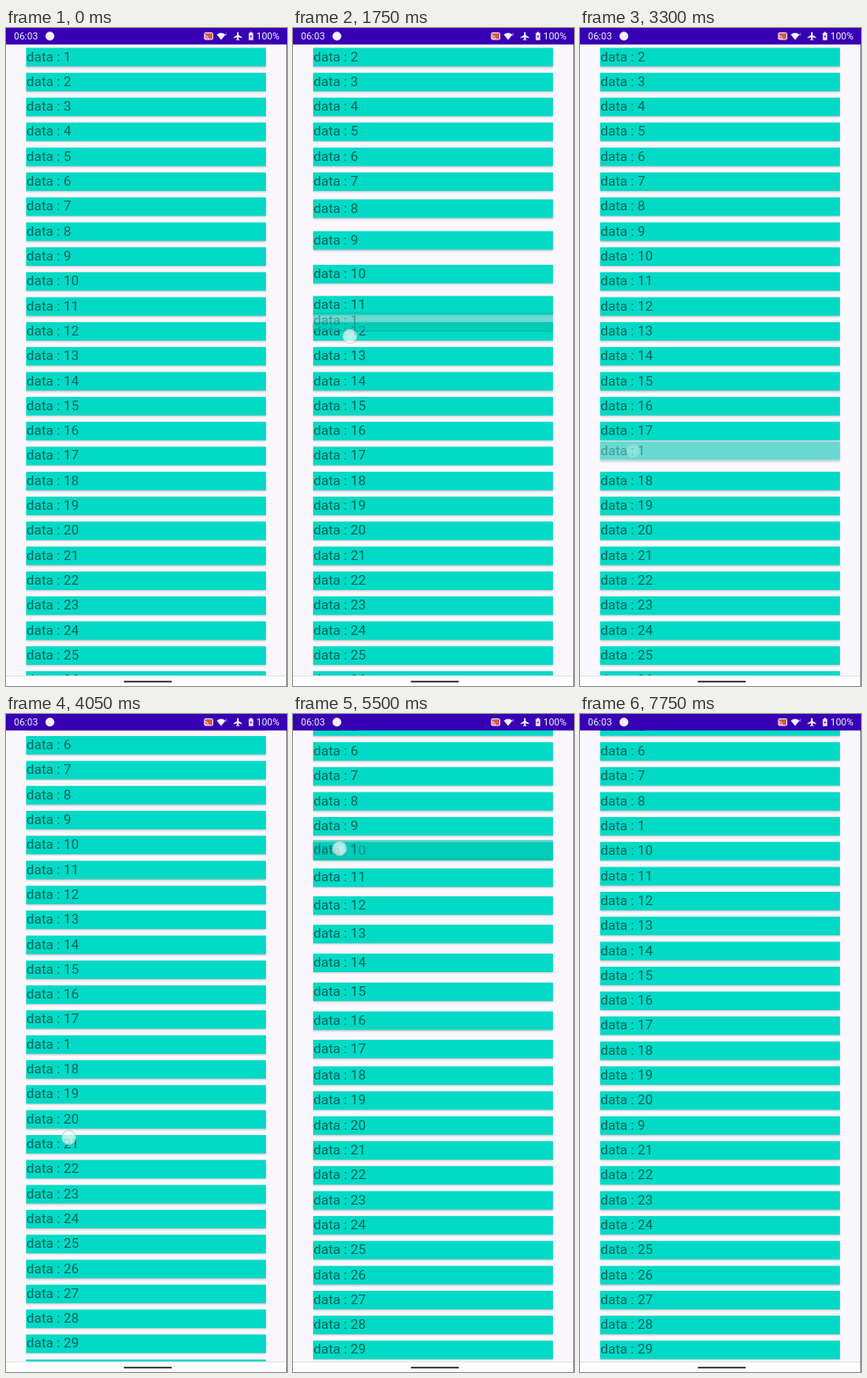
An HTML page that plays this animation: 320 by 747 pixels, repeating every 8 s.

```html
<!DOCTYPE html>
<html lang="en">
<head>
<meta charset="utf-8">
<title>Drag to reorder</title>
<style>
  html, body { margin: 0; width: 100%; height: 100%; overflow: hidden; }
  body { position: relative; background: #faf8fd; font-family: Roboto, sans-serif; }
  #list { position: absolute; inset: 0; overflow: hidden; isolation: isolate; }
  .row {
    position: absolute; left: 23.2px; top: 0; width: 273.3px; height: 20.5px;
    font-size: 15.56px; line-height: 21.6px; white-space: pre;
    color: rgba(0, 0, 0, .54); background: #03dac5;
    box-shadow: 0 1px 2px rgba(0, 0, 0, .22);
  }
  .row.held { z-index: 1; color: rgba(0, 0, 0, .3); background: rgba(3, 218, 197, .55); }
  .row.held::before {
    content: ""; position: absolute; inset: 0; z-index: -1; background: rgba(0, 0, 0, .06);
  }
  #edge { position: absolute; left: 319px; top: 18px; width: 1px; bottom: 0; background: #8f8e92; }
  #bar { position: absolute; left: 0; top: 0; }
  #bar text { font: 11px Roboto, sans-serif; fill: #f3effb; }
  #nav {
    position: absolute; left: 0; top: 735px; width: 319px; height: 12px;
    box-sizing: border-box; background: #fdfcfe; border-top: 1px solid #e3e1e6;
  }
  #nav i {
    position: absolute; left: 134px; top: 5.2px; width: 55px; height: 1.8px;
    border-radius: 1px; background: #444;
  }
  #touch {
    position: absolute; left: -8.5px; top: -8.5px; width: 17px; height: 17px;
    box-sizing: border-box; border-radius: 50%;
    border: 1px solid rgba(120, 165, 162, .45);
    background: radial-gradient(rgba(255, 255, 255, .75), rgba(240, 250, 249, .62));
  }
</style>
</head>
<body>
<div id="list"></div>
<div id="edge"></div>
<svg id="bar" width="320" height="19" viewBox="0 0 320 19">
  <rect width="320" height="18.67" fill="#3700b3"/>
  <text x="9" y="13">06:03</text>
  <circle cx="50" cy="9.3" r="5" fill="#f3effb"/>
  <rect x="226" y="5.5" width="9.5" height="7.5" rx="1" fill="#d85a4a" stroke="#f3effb"/>
  <path d="M226 8.5a4.5 4.5 0 0 1 4.5 4.5M226 10.7a2.3 2.3 0 0 1 2.3 2.3" fill="none" stroke="#f3effb"/>
  <path d="M245 13.6L240 7.4Q245 3.6 250 7.4Z" fill="#f3effb"/>
  <path d="M250.8 5.5v3.5" stroke="#9a80d8"/>
  <path d="M264 4.6q.9 0 .9 1v2.5l3.9 2.4v1l-3.9-1.1v2.2l1.1.8v.7l-2-.5-2 .5v-.7l1.1-.8v-2.2l-3.9 1.1v-1l3.9-2.4V5.6q0-1 .9-1Z" fill="#f3effb"/>
  <path d="M278 4.5h2v1h1.5v8.3h-5V5.5h1.5Z" fill="#f3effb"/>
  <path d="M279.4 7l-1.6 3h1l-.3 2.3 1.7-3h-1Z" fill="#3700b3"/>
  <text x="285" y="13">100%</text>
</svg>
<div id="nav"><i></i></div>
<div id="touch"></div>
<script>
const LOOP = 8000, TICK = 50, MOVE = 250, FADE = 150, LONG_PRESS = 440;
const LEAD = 30; // the row trails the finger by this many ms
const TOP = 22.5, PITCH = 28.31, HALF = 10.5, COUNT = 40;

const clamp = v => Math.min(1, Math.max(0, v));
const ease = v => (1 - Math.cos(Math.PI * clamp(v))) / 2;
const mix = (a, b, v) => a + (b - a) * v;

// Eased travel through [time, value] points.
const glide = (points, t) => points.slice(1).reduce(
  (v, [end, to], i) => mix(v, to, ease((t - points[i][0]) / (end - points[i][0]))), points[0][1]);

const scroll = t => glide([[3800, 0], [4050, 110.7], [4450, 103.7]], t);
const slotY = (pos, t) => TOP + pos * PITCH - scroll(t);

// from and to are list positions, path holds the row's centre, grip is the finger's offset from it
const drags = [
  { id: 1, from: 0, to: 16, down: 450, up: 3200, x: [68, 60], grip: 2.5,
    path: [[887, 33], [2327, 492], [3200, 477]] },
  { id: 1, from: 16, to: 8, down: 4600, up: 5600, x: [58, 52], grip: 12,
    path: [[5215, 382], [5559, 136]] },
  { id: 9, from: 7, to: 19, down: 6150, up: 7500, x: [46, 50], grip: 2.6,
    path: [[6700, 127.4], [7450, 473]] }
];

// Work out when the held row passes each neighbour.
const order = Array.from({ length: COUNT }, (_, i) => i + 1);
for (const d of drags) {
  d.dir = Math.sign(d.to - d.from);
  d.lift = d.down + LONG_PRESS;
  d.end = d.up + MOVE;
  d.fingerY = t => glide(d.path, t + LEAD) + d.grip;
  d.swaps = new Map();
  let t = d.lift;
  for (let p = d.from + d.dir; p !== d.to + d.dir; p += d.dir) {
    while (t < d.up && (glide(d.path, t) - HALF - slotY(p, t)) * d.dir < 0) t++;
    d.swaps.set(order[p], t);
  }
  order.splice(d.to, 0, ...order.splice(d.from, 1));
}

const swipe = { down: 3750, up: 4300, x: [71, 71], fingerY: t => 591 - scroll(t) };
const presses = [...drags, swipe];

const list = document.getElementById("list");
const touch = document.getElementById("touch");
const rows = order.map((_, i) => {
  const el = document.createElement("div");
  el.className = "row";
  el.textContent = "data : " + (i + 1);
  return list.appendChild(el);
});

function rowState(id, t) {
  let pos = id - 1;
  for (const d of drags) {
    if (d.swaps.has(id)) {
      pos -= d.dir * ease((t - d.swaps.get(id)) / MOVE);
    } else if (d.id === id && t >= d.lift) {
      if (t < d.end) {
        const y = glide(d.path, t) - HALF;
        return { y: mix(y, slotY(d.to, t), ease((t - d.up) / MOVE)), held: true };
      }
      pos = d.to;
    }
  }
  return { y: slotY(pos, t), held: false };
}

function drawTouch(t) {
  const p = presses.find(p => t >= p.down && t < p.up + FADE);
  touch.style.opacity = p ? 1 - clamp((t - p.up) / FADE) : 0;
  if (!p) return;
  const x = mix(...p.x, clamp((t - p.down) / (p.up - p.down)));
  touch.style.transform = `translate(${x}px, ${p.fingerY(t)}px)`;
}

function draw(t) {
  rows.forEach((el, i) => {
    const { y, held } = rowState(i + 1, t);
    el.style.transform = `translateY(${y.toFixed(2)}px)`;
    el.classList.toggle("held", held);
  });
  drawTouch(t);
}

const start = performance.now();
function loop() {
  const t = (performance.now() - start) % LOOP;
  draw(Math.floor(t / TICK) * TICK);
  requestAnimationFrame(loop);
}
draw(0);
requestAnimationFrame(loop);
</script>
</body>
</html>
```
